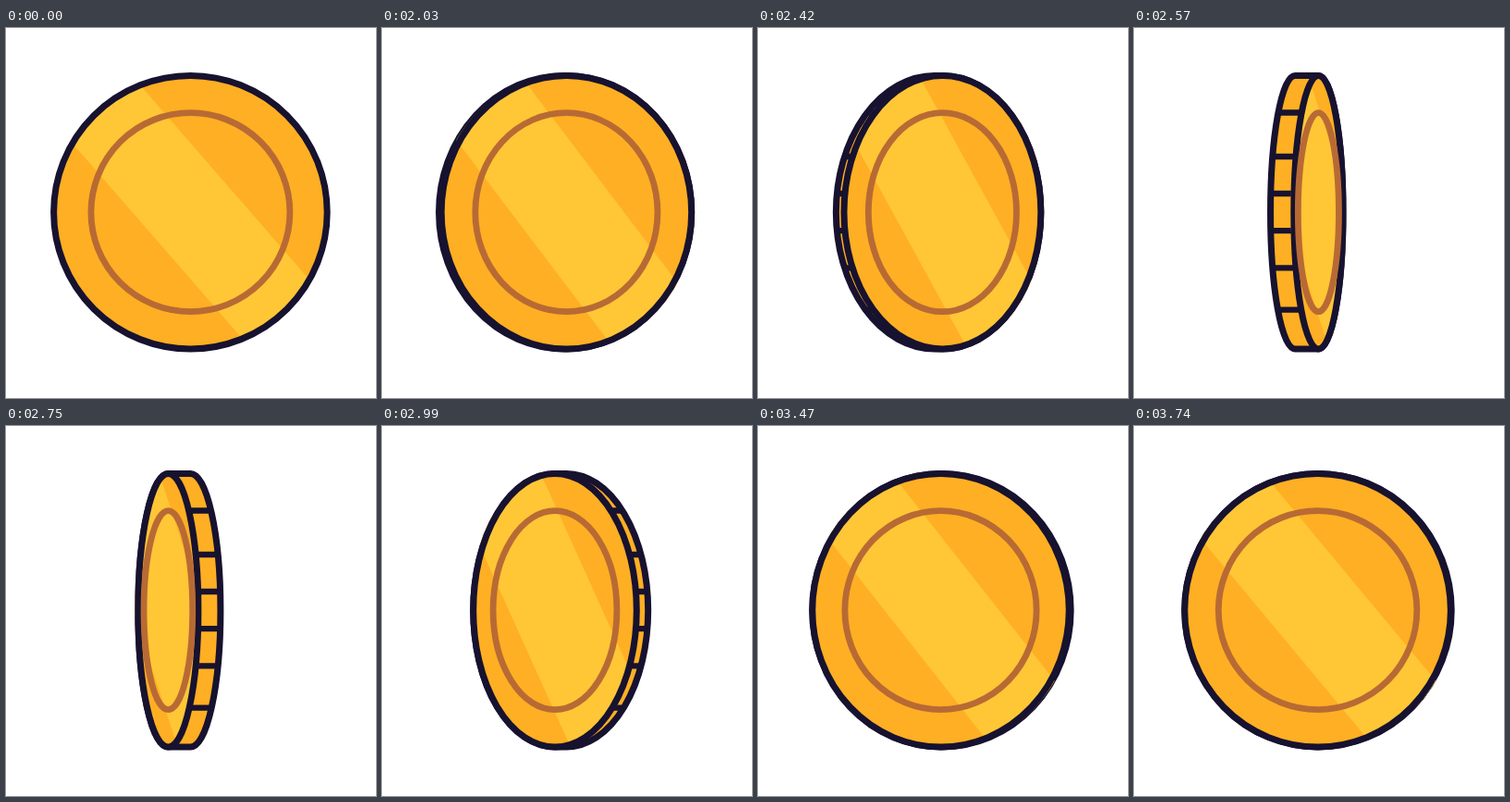
These frames come from a looping animation (400 px wide and 400 px high, 3830 ms). An HTML page with a canvas:

```html
<!DOCTYPE html>
<html lang="en">
<head>
<meta charset="utf-8">
<title>Spinning coin</title>
<style>
html, body { margin: 0; width: 100%; height: 100%; overflow: hidden; background: #fff; }
canvas { display: block; width: 400px; height: 400px; }
</style>
</head>
<body>
<canvas id="stage" width="400" height="400"></canvas>
<script>
const ctx = document.getElementById('stage').getContext('2d');
const LOOP = 3830, REST = 2030, STEP = 30, LAST = 58;
const CX = 199.4, CY = 199.2, R = 147.8, RING = 107.5, DEPTH = 30.8;
const INK = '#17122f', GOLD = '#ffaf23', SHINE = '#ffc636', BROWN = '#b86a34';
const RIDGES = [-107.7, -60.2, -20.2, 20, 60.2, 105.5];

// Spin curve: [step, travel, speed]; a travel of 1 is a quarter turn.
const SPIN = [
  [0, 0, 0.07], [1, 0.085, 0.12], [7, 1.075, 0.19],
  [14, 2.28, 0.14], [25, 3.22, 0.06], [36, 3.7, 0.032],
  [42, 3.847, 0.018], [54, 3.967, 0.003], [58, 3.973, 0.001]
];

function travel(n) {
  let i = 0;
  while (i < SPIN.length - 2 && n > SPIN[i + 1][0]) i++;
  const [n0, a, va] = SPIN[i], [n1, b, vb] = SPIN[i + 1];
  const d = n1 - n0, t = (n - n0) / d, r = 1 - t;
  return r * r * ((1 + 2 * t) * a + t * d * va) + t * t * ((3 - 2 * t) * b - r * d * vb);
}

function oval(x, rx, ry) {
  ctx.beginPath();
  ctx.ellipse(x, CY, Math.max(rx, 0.1), ry, 0, 0, Math.PI * 2);
}

function stroke(color, width) {
  ctx.strokeStyle = color;
  ctx.lineWidth = width;
  ctx.stroke();
}

function fill(color) {
  ctx.fillStyle = color;
  ctx.fill();
}

function drawEdge(near, back, rx) {
  const q = Math.PI / 2, w = Math.max(rx, 0.1);
  ctx.beginPath();
  ctx.ellipse(Math.max(near, back), CY, w, R, 0, -q, q);
  ctx.ellipse(Math.min(near, back), CY, w, R, 0, q, 3 * q);
  ctx.closePath();
  fill(GOLD);
  stroke(INK, 7);

  const side = Math.sign(back - near);
  ctx.beginPath();
  for (const dy of RIDGES) {
    const reach = side * rx * Math.sqrt(1 - (dy / R) ** 2);
    ctx.moveTo(near + reach, CY + dy);
    ctx.lineTo(back + reach, CY + dy);
  }
  stroke(INK, 6.3);
}

function drawShine(x, s) {
  const u = 1 - s;
  const half = 64 - 33 * u;
  const lean = (0.87 - 1.4 * u + 0.9 * u * u) * 160;
  const mid = x + 1.2 * s;
  ctx.save();
  oval(x, 149.5 * Math.min(1, s + 0.02), 149.5);
  ctx.clip();
  ctx.beginPath();
  ctx.moveTo(mid - half - lean, CY - 160);
  ctx.lineTo(mid + half - lean, CY - 160);
  ctx.lineTo(mid + half + lean, CY + 160);
  ctx.lineTo(mid - half + lean, CY + 160);
  ctx.closePath();
  fill(SHINE);
  ctx.restore();
}

function draw(n) {
  const phase = travel(n) % 2;
  const closing = phase < 1;
  const s = Math.abs(1 - phase);
  const shifted = CX - DEPTH * (1 - s);
  const near = closing ? CX : shifted;
  const back = closing ? shifted : CX;

  ctx.fillStyle = '#fff';
  ctx.fillRect(0, 0, 400, 400);
  if (s < 1) drawEdge(near, back, R * s);

  oval(near, R * s, R);
  fill(GOLD);
  drawShine(near, s);
  oval(near, R * s, R);
  stroke(INK, 7);

  // The ring stays a touch wider than the rim's scale.
  oval(near, RING * Math.min(1, s + 0.025 * Math.min(1, n / 14)), RING);
  stroke(BROWN, 6.8);
}

function tick() {
  const t = performance.now() % LOOP;
  draw(t < REST ? 0 : Math.min(LAST, Math.floor((t - REST) / STEP) + 1));
  requestAnimationFrame(tick);
}
tick();
</script>
</body>
</html>
```
